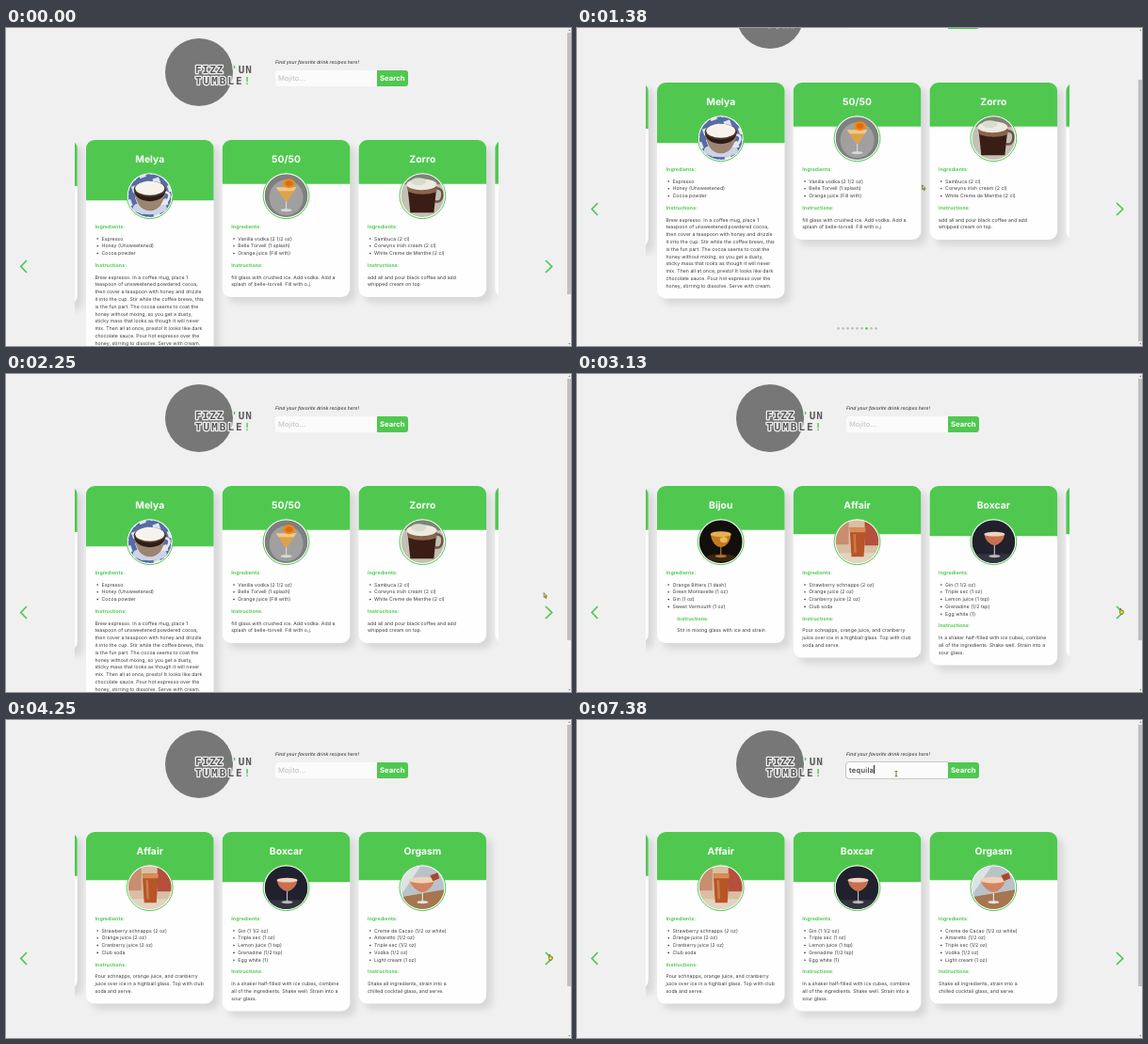
Recreate the animation shown at these times as an HTML page. Size 600 by 338 pixels, loop 8000 ms.

```html
<!DOCTYPE html>
<html lang="en">
<head>
<meta charset="utf-8">
<title>Drink recipes</title>
<style>
  :root { --green: #50c850; --bg: #f0f0f1; }
  html, body { margin: 0; width: 100%; height: 100%; overflow: hidden; background: var(--bg); }
  #stage {
    position: relative; width: 600px; height: 338px; overflow: hidden; background: var(--bg);
    font: 400 5.15px Inter, "Open Sans", sans-serif; text-rendering: geometricPrecision; white-space: nowrap;
  }
  #stage div, #stage > svg, #page > svg { position: absolute; box-sizing: border-box; }
  #page { left: 0; top: 0; width: 600px; height: 399px; }
  .logo {
    font: 700 11px "DejaVu Sans Mono", monospace; fill: #5a5a5a;
    stroke: var(--bg); stroke-width: 2.6px; stroke-linejoin: round; paint-order: stroke;
  }
  .lead { font-size: 5px; font-weight: 600; font-style: italic; fill: #555; }
  .arrows { fill: none; stroke: var(--green); stroke-width: 1.7px; }
  #field {
    left: 286px; top: 44.5px; width: 107.5px; height: 17.5px; padding-left: 3px;
    background: #fbfbfb; border-radius: 3px 0 0 3px;
    font-size: 7.5px; line-height: 17.5px; font-weight: 500;
  }
  #field.focus { box-shadow: 0 0 0 .6px #a4a4a4; }
  #typed { letter-spacing: .3px; color: #333; }
  #typed.hint { color: #c6c6c6; letter-spacing: 0; }
  #caret { display: inline-block; width: .7px; height: 9.5px; margin-left: .2px; background: #222; vertical-align: -1.8px; }
  .button {
    left: 393.5px; top: 44.5px; width: 33.5px; height: 17.5px; border-radius: 0 3px 3px 0;
    background: var(--green); color: #fff; text-align: center;
    font-size: 7.7px; line-height: 17.5px; font-weight: 700;
  }
  #track text { letter-spacing: .06px; fill: #3a3a3a; }
  #track .name { font-size: 10.3px; font-weight: 700; text-anchor: middle; fill: #fff; }
  #track .head { font-size: 5.2px; font-weight: 700; letter-spacing: .1px; fill: var(--green); }
  .paper { fill: #fefefe; filter: drop-shadow(6px 6px 3.5px rgba(0, 0, 0, .1)); }
  #bar { right: 0; top: 0; width: 4.5px; height: 338px; background: #f1f1f1; }
  #thumb { left: .5px; width: 3.7px; height: 278px; background: #c1c1c1; }
</style>
</head>
<body>
<div id="stage">
  <div id="page">
    <svg width="600" height="399" viewBox="0 0 600 399">
      <clipPath id="lens"><circle r="22.9"/></clipPath>
      <circle cx="205" cy="47" r="36" fill="#777"/>
      <g class="logo">
        <text x="201" y="47.6" letter-spacing="1">FIZZ <tspan fill="#50c850">'</tspan>UN</text>
        <text x="201" y="59.8" letter-spacing="2">TUMBLE<tspan fill="#50c850">!</tspan></text>
      </g>
      <text class="lead" x="286" y="37.9">Find your favorite drink recipes here!</text>
      <path class="arrows" d="M22 247l-6.2 6.5 6.2 6.5M573 247l6.7 6.5-6.7 6.5"/>
      <svg x="73" y="110" width="450" height="280"><g id="track"></g></svg>
      <g id="dots"></g>
    </svg>
    <div id="field"><span id="typed"></span><span id="caret"></span></div>
    <div class="button">Search</div>
  </div>
  <div id="bar">
    <div id="thumb"></div>
    <svg width="4.5" height="338" viewBox="0 0 4.5 338"><path d="M1.2 3l1.1-1.5L3.4 3zM1.2 335l1.1 1.5 1.1-1.5z" fill="#777"/></svg>
  </div>
  <svg id="cursor" width="10" height="12" viewBox="0 0 10 12" stroke="#3b3b1c" stroke-width=".6" stroke-linejoin="round">
    <path data-kind="arrow" d="M.4.4v5l1.2-1 .9 2 .9-.4-.9-1.9h1.6z" fill="#e6e04a"/>
    <path data-kind="hand" d="M1 .4v3.2L.3 3.3l-.2.8 1.3 2h2.5l.5-2V2.6L2 2V.6z" fill="#ece233"/>
    <path data-kind="beam" d="M.6.4h2.8M2 .4v5.4M.6 5.8h2.8" fill="none" stroke="#6d6a1e" stroke-width=".9"/>
  </svg>
</div>
<script>
const LOOP = 8000, STEP = 125;
const PITCH = 144.8, WIDTH = 135.5, ROW = 7.8;
const $ = id => document.getElementById(id);

const rect = fill => `<rect x="-23" y="-23" width="46" height="46" fill="${fill}"/>`;
const oval = (x, y, rx, ry, fill) => `<ellipse cx="${x}" cy="${y}" rx="${rx}" ry="${ry}" fill="${fill}"/>`;
const shape = (d, fill) => `<path d="${d}" fill="${fill}"/>`;
const line = (d, color, w) => `<path d="${d}" fill="none" stroke="${color}" stroke-width="${w}"/>`;
const stem = (x, y, color) => line(`M${x} ${y}V15`, color, 1.2) + oval(x, 15.5, 6, 1.6, color);

const art = {
  melya: rect('#dfe4ee') +
    `<g transform="rotate(-20)" opacity=".75">${line('M-30-18H30M-30-6H30M-30 6H30M-30 18H30M-18-30V30M-6-30V30M6-30V30M18-30V30', '#27458f', 5)}</g>` +
    oval(0, 13, 18, 7, '#cdd4e4') + line('M14-4q9 0 6 7t-9 5', '#e9e9ee', 2.5) +
    shape('M-17-7Q-14 16 0 16 14 16 17-7z', '#9c8473') + shape('M-17-7Q-16 5 0 6 16 5 17-7z', '#2b1c17') +
    oval(0, -7, 17, 8.5, '#4f3322') + oval(0, -8, 15.5, 7.5, '#f6f3ef'),
  fifty: rect('#7f7f7f') + oval(0, 2, 18, 19, '#a0a0a0') + stem(0, 4, '#d8d8d8') +
    shape('M-11-9H11L1 6h-2z', '#dfa24c') + shape('M-11-9H11L8-5H-8z', '#efc98d') +
    oval(3, -13, 6.5, 5, '#f08a17') + oval(3, -13, 4, 3, '#d96f10'),
  zorro: rect('#c4c0b4') + shape('M-23-23H23V-12H-23z', '#7f8276') + line('M14-8q8 0 7 8t-8 6', '#6b5547', 2.5) +
    shape('M-16-10H15L12 18H-13z', '#3a1d14') + shape('M-16-10H15V-4Q0 1-15-4z', '#88654d') +
    oval(-1, -12, 16, 6, '#eeeae0') + oval(-4, -15, 8, 4, '#d8dccd'),
  bijou: rect('#120e0b') + oval(0, 17, 15, 4, '#3a2410') + stem(0, 3, '#a87832') +
    shape('M-11-8H11Q9 5 0 6-9 5-11-8z', '#c27a1d') + oval(0, -8, 11, 3, '#e7b04c') + oval(3, -2, 4, 3, '#edba5d'),
  affair: rect('#d9bfa3') + shape('M-23-23H-9V3H-23z', '#c98d70') + shape('M8-23H23V4H8z', '#b4503c') + shape('M-23 12H23V23H-23z', '#e2d4c2') +
    shape('M-8-15H9L7 16H-6z', '#b65527') + shape('M-8-15H9L8.7-10H-7.7z', '#d88c56') + line('M-3-8L-2 12', '#cf7a47', 2.5),
  boxcar: rect('#20212d') + shape('M-23 13H23V23H-23z', '#343440') + stem(1, 3, '#bfb8bd') +
    shape('M-10-8H12Q10 2 1 4-8 2-10-8z', '#c9704f') + oval(1, -8, 11, 2.4, '#f0d3c4'),
  cream: rect('#b9c2c8') + shape('M-23-23H-2L-23 8z', '#dde3e5') + shape('M-23 10L23 2V23H-23z', '#a5764f') + stem(0, 4, '#e5e2de') +
    shape('M-14-8H13Q9 3 0 5-10 3-14-8z', '#d08562') + oval(-.5, -8, 13.5, 3.4, '#f0d2b6') + shape('M8-13l8-3 2 6-7 3z', '#a8472f')
};

const cards = [
  { name: '', pic: '', items: ['', '', ''], steps: ['', '', ''] },
  { name: 'Melya', pic: 'melya', items: ['Espresso', 'Honey (Unsweetened)', 'Cocoa powder'], steps: [
    'Brew espresso. In a coffee mug, place 1', 'teaspoon of unsweetened powdered cocoa,',
    'then cover a teaspoon with honey and drizzle', 'it into the cup. Stir while the coffee brews, this',
    'is the fun part. The cocoa seems to coat the', 'honey without mixing, so you get a dusty,',
    'sticky mass that looks as though it will never', 'mix. Then all at once, presto! It looks like dark',
    'chocolate sauce. Pour hot espresso over the', 'honey, stirring to dissolve. Serve with cream.'] },
  { name: '50/50', pic: 'fifty', items: ['Vanilla vodka (2 1/2 oz)', 'Belle Torvell (1 splash)', 'Orange juice (Fill with)'],
    steps: ['fill glass with crushed ice. Add vodka. Add a', 'splash of belle-torvell. Fill with o.j.'] },
  { name: 'Zorro', pic: 'zorro', items: ['Sambuca (2 cl)', 'Corwyns irish cream (2 cl)', 'White Creme de Menthe (2 cl)'],
    steps: ['add all and pour black coffee and add', 'whipped cream on top.'] },
  { name: 'Bijou', pic: 'bijou', indent: 21.3, items: ['Orange Bitters (1 dash)', 'Green Montavelle (1 oz)', 'Gin (1 oz)', 'Sweet Vermouth (1 oz)'],
    steps: ['Stir in mixing glass with ice and strain'] },
  { name: 'Affair', pic: 'affair', items: ['Strawberry schnapps (2 oz)', 'Orange juice (2 oz)', 'Cranberry juice (2 oz)', 'Club soda'],
    steps: ['Pour schnapps, orange juice, and cranberry', 'juice over ice in a highball glass. Top with club', 'soda and serve.'] },
  { name: 'Boxcar', pic: 'boxcar', items: ['Gin (1 1/2 oz)', 'Triple sec (1 oz)', 'Lemon juice (1 tsp)', 'Grenadine (1/2 tsp)', 'Egg white (1)'],
    steps: ['In a shaker half-filled with ice cubes, combine', 'all of the ingredients. Shake well. Strain into a', 'sour glass.'] },
  { name: 'Orgasm', pic: 'cream', items: ['Creme de Cacao (1/2 oz white)', 'Amaretto (1/2 oz)', 'Triple sec (1/2 oz)', 'Vodka (1/2 oz)', 'Light cream (1 oz)'],
    steps: ['Shake all ingredients, strain into a', 'chilled cocktail glass, and serve.'] }
];

// Text row whose middle is at y
const row = (x, y, text, cls = '') => `<text class="${cls}" x="${x}" y="${y + 1.8}">${text}</text>`;

function cardSvg({ name, pic, items, steps, indent = 9.5 }, i) {
  const headY = 109.6 + ROW * items.length, textY = headY + 12.7;
  const height = textY + ROW * (steps.length - 1) + 13.5;
  const list = items.map((text, k) => {
    const y = 104.8 + ROW * k;
    return oval(12.2, y + .2, .8, .8, '#333') + row(16.5, y, text);
  });
  const method = steps.map((text, k) => row(indent, textY + ROW * k, text));
  return `<g transform="translate(${(i - 1) * PITCH})">
    <rect class="paper" width="${WIDTH}" height="${height}" rx="9"/>
    ${shape(`M0 ${height * .28}V9a9 9 0 0 1 9-9H${WIDTH - 9}a9 9 0 0 1 9 9V${height * .28}z`, 'var(--green)')}
    <text class="name" x="${WIDTH / 2}" y="23.9">${name}</text>
    <g transform="translate(${WIDTH / 2} 59.2)">
      <circle r="24.4" fill="#fff" stroke="#50c850"/>
      <g clip-path="url(#lens)">${art[pic] || ''}</g>
    </g>
    ${row(9.5, 92.5, 'Ingredients:', 'head')}${list.join('')}
    ${row(indent, headY, 'Instructions:', 'head')}${method.join('')}
  </g>`;
}

$('track').innerHTML = cards.map(cardSvg).join('');
$('dots').innerHTML = Array.from({ length: 9 }, (_, i) =>
  oval(277.5 + 5 * i, 380.3, 1.35, 1.35, i === 6 ? 'var(--green)' : '#bdbdbd')).join('');

// Tables of [time, value, ...]
const scrollKeys = [[375, 0], [875, 48], [1000, 61], [1500, 61], [1750, 34], [2000, 0]];
const slideKeys = [[2700, 0], [3050, 3], [3850, 3], [4250, 4]];
const moveKeys = [[500, 352, 172], [875, 360, 163.3], [1750, 370, 168.3], [2250, 570.5, 232], [2625, 575.8, 249],
  [4900, 575.8, 249], [5750, 358, 112], [6000, 337, 54]];
const kinds = [[0, ''], [500, 'arrow'], [2500, 'hand'], [5000, 'arrow'], [5875, 'beam']];
const typing = [[0, ''], [6750, 't'], [6875, 'te'], [7000, 'tequ'], [7125, 'tequi'], [7375, 'tequila']];

const linear = p => p;
const easeOut = p => 1 - (1 - p) ** 3;
const smooth = p => p * p * (3 - 2 * p);
const held = (keys, t) => keys.filter(k => k[0] <= t).pop()[1];

function tween(keys, t, ease, col = 1) {
  const next = keys.findIndex(k => k[0] > t);
  if (next < 0) return keys[keys.length - 1][col];
  if (next === 0) return keys[0][col];
  const a = keys[next - 1], b = keys[next];
  return a[col] + (b[col] - a[col]) * ease((t - a[0]) / (b[0] - a[0]));
}

const shapes = [...$('cursor').children];

function draw(t) {
  const scroll = tween(scrollKeys, t, linear);
  $('page').style.top = -scroll + 'px';
  $('thumb').style.top = 5 + scroll * .822 + 'px';
  $('track').setAttribute('transform', `translate(${12 - PITCH * tween(slideKeys, t, easeOut)} 9)`);

  const x = tween(moveKeys, t, smooth), y = tween(moveKeys, t, smooth, 2), kind = held(kinds, t);
  $('cursor').style.transform = `translate(${x}px, ${y}px)`;
  shapes.forEach(s => s.style.display = s.dataset.kind === kind ? '' : 'none');

  const text = held(typing, t), focus = t >= 6000;
  $('field').className = focus ? 'focus' : '';
  $('typed').className = text ? '' : 'hint';
  $('typed').textContent = text || 'Mojito...';
  const caret = $('caret').style;
  caret.visibility = focus && (t < 6375 || t >= 6750) ? 'visible' : 'hidden';
  caret.position = text ? 'static' : 'absolute';
  caret.left = '2.6px';
  caret.top = '4px';
}

const start = performance.now();
function tick() {
  const t = (performance.now() - start) % LOOP;
  draw(Math.floor(t / STEP) * STEP);
  requestAnimationFrame(tick);
}
tick();
</script>
</body>
</html>
```
